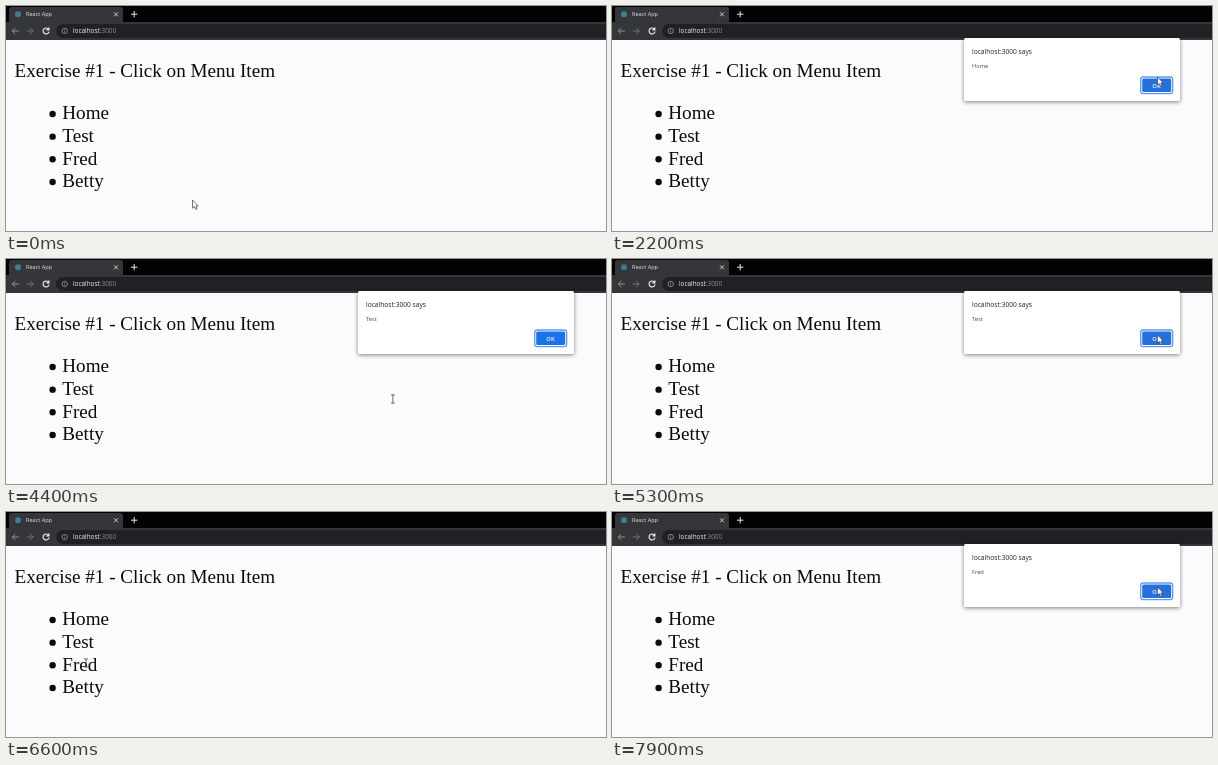
Recreate the animation shown at these times as an HTML page. Size 600 by 225 pixels, loop 8 s.

```html
<!DOCTYPE html>
<html lang="en">
<head>
<meta charset="utf-8">
<title>Menu exercise</title>
<style>
  html, body { margin: 0; width: 100%; height: 100%; overflow: hidden; background: #fcfafd; }
  svg { display: block; width: 600px; height: 225px; }
  .page { font: 19.15px "Liberation Serif", "Times New Roman", serif; fill: #0b0b0d; }
  .ui { font-family: "Open Sans", "Noto Sans", sans-serif; }
  .shadow { filter: drop-shadow(0 1px 2px rgba(0, 0, 0, .5)); }
  .line { fill: none; stroke-linecap: round; stroke-linejoin: round; }
</style>
</head>
<body>
<svg viewBox="0 0 600 225">
  <rect width="600" height="225" fill="#fcfafd"/>

  <g class="ui">
    <rect width="600" height="17" fill="#030303"/>
    <rect y="16" width="600" height="18" fill="#35363a"/>
    <rect x="3" y="1" width="114" height="20" rx="3" fill="#35363a"/>
    <circle cx="12" cy="8.3" r="3" fill="#3b7f93"/>
    <text x="20" y="10.2" font-size="5.55" fill="#e4e5e8">React App</text>
    <path class="line" d="M108.3 6.6l3.4 3.4m0-3.4l-3.4 3.4" stroke="#d5d6d9" stroke-width=".9"/>
    <path class="line" d="M125.4 8.2h5.6m-2.8-2.8v5.6" stroke="#e8e8ea"/>
    <rect x="50" y="18" width="570" height="14" rx="7" fill="#202124"/>
    <path class="line" d="M12.5 25H6.3m2.8-2.8L6.3 25l2.8 2.8" stroke="#9a9ca0" stroke-width=".9"/>
    <path class="line" d="M21 25h6.2m-2.8-2.8l2.8 2.8l-2.8 2.8" stroke="#74767a" stroke-width=".9"/>
    <path class="line" d="M42.5 23.2A3 3 0 1 0 42.9 26m0-4.2v2.1h-2.1" stroke="#f1f1f3" stroke-width="1.1"/>
    <circle cx="58.7" cy="25" r="2.7" fill="none" stroke="#a4a6aa" stroke-width=".7"/>
    <path d="M58.7 23.3v.7m0 .7v1.9" stroke="#a4a6aa" stroke-width=".7"/>
    <text x="67" y="27.3" font-size="6.4" fill="#f0f0f2">localhost<tspan fill="#8d9095">:3000</tspan></text>
  </g>

  <g class="page" id="page">
    <text x="8.6" y="71.4">Exercise #1 - Click on Menu Item</text>
  </g>

  <g class="ui" id="dialog" fill="#202124">
    <rect class="shadow" x="352" y="32" width="216" height="63" rx="1.5" fill="#fff"/>
    <text x="360" y="48" font-size="6.66">localhost:3000 says</text>
    <text x="360" y="61.5" font-size="5.7" fill="#45464a" id="message"></text>
    <rect x="528.7" y="71" width="32" height="16.6" rx="2.4" fill="#fff" stroke="#5b9bf0" stroke-width="1.3"/>
    <rect x="530.2" y="72.5" width="29" height="13.6" rx="1.5" fill="#1a73e8" id="button"/>
    <text x="544.5" y="81.5" font-size="5.8" font-weight="600" text-anchor="middle" fill="#fff">OK</text>
  </g>

  <g id="pointer">
    <path id="arrow" d="M0 0V8.2L1.9 6.5L3.2 9.4L4.6 8.8L3.3 6H5.8Z"
      fill="#fff" stroke="#3c3c40" stroke-width=".7" stroke-linejoin="round"/>
    <path id="beam" class="line" d="M-1.6-4h3.2M0-4v8m-1.6 0h3.2" stroke="#4a4a4e" stroke-width=".8"/>
  </g>
</svg>
<script>
  const LOOP = 8000, STEP = 100;
  const ITEMS = ["Home", "Test", "Fred", "Betty"];

  // Eased moves: start, end, bend of the curve, destination
  const ORIGIN = [186.5, 194];
  const MOVES = [
    [0, 700, [120, 135], [78, 109]],
    [1600, 2200, [300, 235], [545.5, 71]],
    [2700, 3400, [300, 170], [64, 118]],
    [3500, 3800, [74, 122], [84, 126]],
    [4100, 4700, [459, 179], [545.5, 76]],
    [5400, 6200, [391, 207], [80, 151]],
    [6800, 7700, [272, 206], [545.5, 75]]
  ];
  // Opening time, closing time, message
  const ALERTS = [[900, 2700, ITEMS[0]], [4000, 5400, ITEMS[1]], [6800, LOOP, ITEMS[2]]];

  const el = id => document.getElementById(id);
  const show = (id, on) => el(id).setAttribute("visibility", on ? "visible" : "hidden");

  el("page").innerHTML += ITEMS.map((name, i) => {
    const y = 113.3 + i * 22.65;
    return `<circle cx="46.6" cy="${y - 5.3}" r="3.2"/><text x="56.3" y="${y}">${name}</text>`;
  }).join("");

  function pointAt(t) {
    let from = ORIGIN;
    for (const [start, end, bend, to] of MOVES) {
      if (t <= start) break;
      const u = Math.min(1, (t - start) / (end - start));
      const k = u * u * (3 - 2 * u), j = 1 - k;
      from = from.map((a, i) => j * j * a + 2 * j * k * bend[i] + k * k * to[i]);
    }
    return from;
  }

  function draw(now) {
    const t = Math.floor((now % LOOP) / STEP) * STEP;
    const [x, y] = pointAt(t);
    const alert = ALERTS.find(([open, close]) => t >= open && t < close);
    show("dialog", alert);
    if (alert) el("message").textContent = alert[2];
    const hover = alert && x > 530 && y > 70 && y < 87;
    el("button").setAttribute("fill", hover ? "#2470dc" : "#1a73e8");

    // The text pointer shows over the list, but lags behind the fast return
    const beam = y > 97 && y < 186 && !(t >= 5400 && t < 6000);
    show("beam", beam);
    show("arrow", !beam);
    el("pointer").setAttribute("transform", `translate(${x} ${y})`);
  }

  const start = performance.now();
  function tick() {
    draw(performance.now() - start);
    requestAnimationFrame(tick);
  }
  tick();
</script>
</body>
</html>
```
